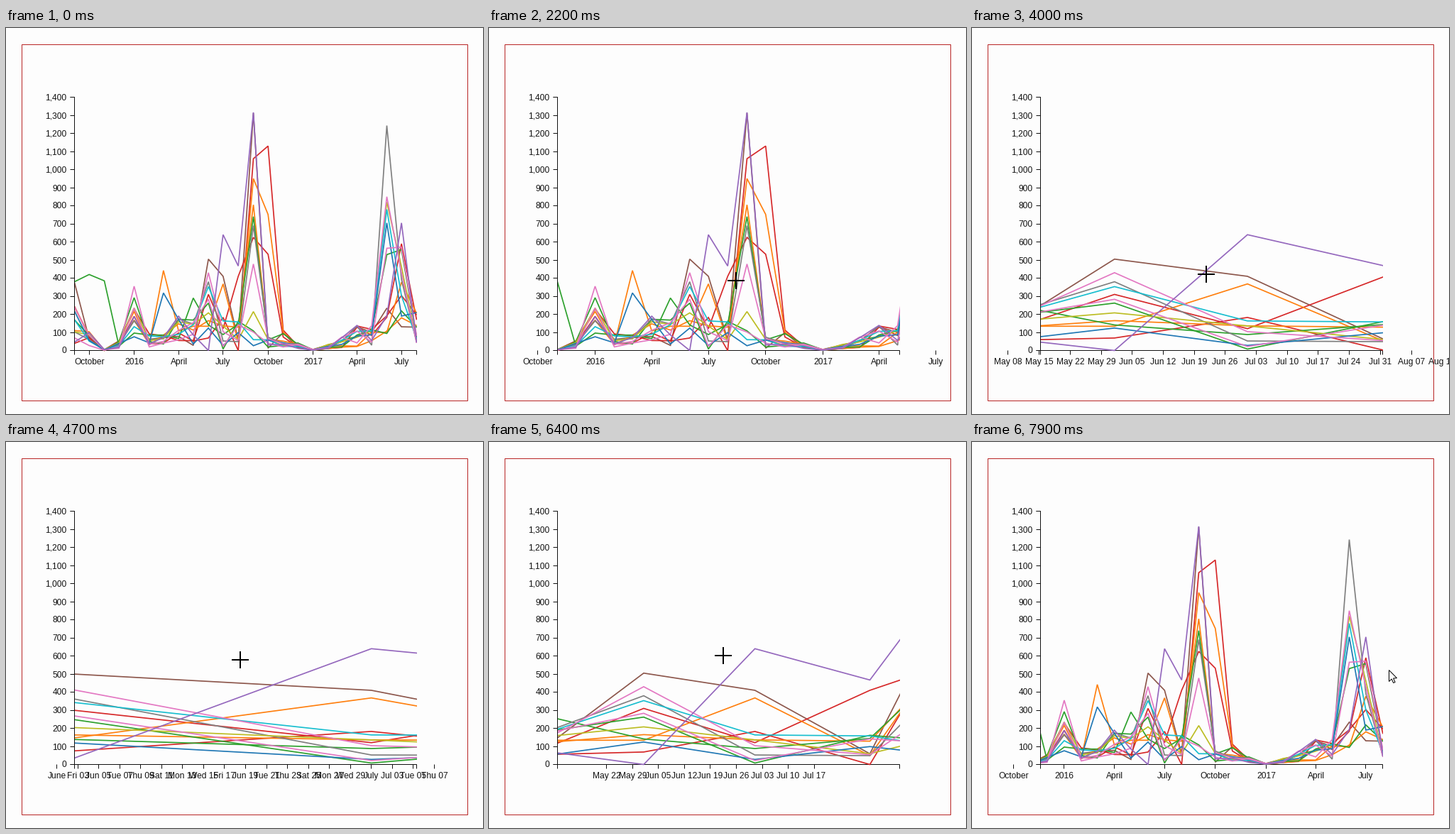
A matplotlib script that plays this animation: 672x544 px, repeating every 8 s.

```python
import math
import numpy as np
import matplotlib.pyplot as plt
from matplotlib.animation import FuncAnimation
from matplotlib.patches import Polygon, Rectangle

W, H, DPI = 672, 544, 100
FRAMES, STEP = 80, 100
LEFT, RIGHT, BASE = 96.5, 578.5, 454.5
UNIT = 0.255
PX = 72 / DPI
INK, PAPER = "#111111", "#fdfdfd"
START = np.datetime64("2015-09-01")
MONTHS = "January February March April May June July August September October November December".split()
WEEKDAYS = "Thu Fri Sat Sun Mon Tue Wed".split()

# colour and the points where a line stands out, {month: value}
SERIES = [
    ("brown", {0: 375, 9: 505, 10: 410, 12: 1312}),
    ("red", {9: 310, 11: 410, 12: 625, 13: 532, 22: 590}),
    ("red", {11: 0, 12: 1060, 13: 1130}),
    ("orange", {6: 442, 10: 368, 12: 950, 13: 752}),
    ("orange", {9: 165, 12: 805}),
    ("green", {0: 380, 1: 420, 2: 385, 8: 290, 12: 740}),
    ("green", {4: 292, 9: 262, 10: 8, 21: 530}),
    ("gray", {9: 380, 12: 690, 21: 1243}),
    ("olive", {9: 208, 12: 215, 21: 820}),
    ("cyan", {9: 353, 21: 780}),
    ("blue", {6: 318, 10: 28, 21: 705}),
    ("pink", {9: 430, 12: 478, 21: 850}),
    ("pink", {4: 355, 9: 283, 10: 22, 21: 565}),
    ("purple", {9: 0, 10: 640, 11: 467, 12: 1316, 22: 705}),
]

# seasonal bumps shared by all lines: month, height, half width
BUMPS = [(0, 180, 1.6), (4, 160, 1.3), (7, 140, 2.5), (10.5, 150, 3),
         (14, 75, 1.5), (19.5, 115, 3), (22, 380, 1.6)]

# time, first visible day, visible days
VIEW = [(1900, 0, 700), (2100, 18.4, 655), (2200, 61.6, 549.6), (3000, 236.9, 127.4),
        (3200, 236.9, 127.4), (3900, 247.5, 103), (4000, 257.3, 77.2),
        (5400, 283.45, 13.8), (5700, 283.45, 13.8), (6000, 281.3, 18.24),
        (6900, 0, 700), (7800, 0, 700), (7900, 79, 620.5)]

# time, x, y
POINTER = [(400, 208, 240), (700, 250, 136), (1000, 309, 286), (2200, 348, 356),
           (3100, 268, 297), (3200, 268, 297), (4000, 330, 347), (4800, 330, 301),
           (6500, 330, 301), (7100, 526, 301), (7900, 587, 321)]


def season(month):
    return sum(h * max(0, 1 - abs(month - c) / w) for c, h, w in BUMPS)


def series_values(rng, peaks):
    return np.array([peaks.get(m, rng.uniform(0.2, 1.5) * season(m) + 6 * noise)
                     for m, noise in enumerate(rng.random(24))])


def view(t):
    """First and last visible day, zooming geometrically about a fixed point."""
    t = min(max(t, VIEW[0][0]), VIEW[-1][0])
    for (t0, a0, s0), (t1, a1, s1) in zip(VIEW, VIEW[1:]):
        if t <= t1:
            break
    span = s0 * (s1 / s0) ** ((t - t0) / (t1 - t0))
    q = (s0 - span) / (s0 - s1) if s0 != s1 else 0
    first = a0 + (a1 - a0) * q
    return first, first + span


def date_parts(day):
    date = START + np.timedelta64(day, "D")
    year, month, dom = map(int, str(date).split("-"))
    return year, month - 1, dom, WEEKDAYS[int(date.astype(int)) % 7]


CALENDAR = [date_parts(d) for d in range(701)]
RULES = {1: lambda m, d, w: True,
         2: lambda m, d, w: d % 2 == 1,
         7: lambda m, d, w: w == "Sun",
         30: lambda m, d, w: d == 1,
         90: lambda m, d, w: d == 1 and m % 3 == 0}


def tick_days(first, last):
    target = (last - first) / 10
    rule = RULES[min(RULES, key=lambda step: abs(math.log(target / step)))]
    lo, hi = max(0, math.ceil(first)), min(700, math.floor(last))
    return [d for d in range(lo, hi + 1) if rule(*CALENDAR[d][1:])]


def tick_label(day):
    year, month, dom, weekday = CALENDAR[day]
    if dom == 1:
        return MONTHS[month] if month else str(year)
    if weekday == "Sun":
        return f"{MONTHS[month][:3]} {dom:02d}"
    return f"{weekday} {dom:02d}"


fig = plt.figure(figsize=(W / DPI, H / DPI), dpi=DPI, facecolor=PAPER)
ax = fig.add_axes([0, 0, 1, 1])
ax.set_xlim(0, W)
ax.set_ylim(H, 0)
ax.axis("off")

FONT = dict(family="Liberation Sans", size=12 * PX, color=INK, va="baseline")


def stroke(xs, ys, width=1, color=INK, zorder=2):
    return ax.plot(xs, ys, color=color, lw=width * PX, zorder=zorder, snap=False,
                   solid_capstyle="butt", solid_joinstyle="miter")[0]


ax.add_patch(Rectangle((22.5, 23.5), 628, 502, fill=False, ec="#b82626", lw=PX, snap=False))

plot_clip = Rectangle((LEFT, 90), RIGHT - LEFT, 366, transform=ax.transData)
page_clip = Rectangle((23, 24), 627, 501, transform=ax.transData)

month_days = np.array([d for d, c in enumerate(CALENDAR) if c[2] == 1])
rng = np.random.default_rng(7)
lines = []
for color, peaks in SERIES:
    values = series_values(rng, peaks)
    line = stroke(month_days, BASE - UNIT * values, 1.7, "tab:" + color, zorder=3)
    line.set_clip_path(plot_clip)
    lines.append(line)

stroke([LEFT - 6, LEFT, LEFT, LEFT - 6], [97.5, 97.5, BASE, BASE])
stroke([LEFT, LEFT, RIGHT, RIGHT], [BASE + 6, BASE, BASE, BASE + 6])
for value in range(0, 1401, 100):
    y = math.floor(BASE - UNIT * value) + 0.5
    stroke([LEFT - 6, LEFT], [y, y])
    ax.text(85.5, y + 4, f"{value:,}", ha="right", **FONT)

ticks = []
for _ in range(30):
    mark = stroke([0, 0], [BASE, BASE + 6])
    label = ax.text(0, 474, "", ha="center", zorder=4, **FONT)
    mark.set_clip_path(page_clip)
    label.set_clip_path(page_clip)
    ticks.append((mark, label))

cross = [stroke([0], [0], 2, "black", zorder=6) for _ in range(2)]
ARROW = np.array([(0, 0), (0, 16), (3.7, 12.5), (6.2, 18), (8.6, 17), (6.1, 11.5), (11, 11.2)])
arrow = Polygon(ARROW, fc="white", ec="black", lw=PX, zorder=6)
ax.add_patch(arrow)


def draw_pointer(t):
    times, xs, ys = zip(*POINTER)
    x, y = round(np.interp(t, times, xs)), round(np.interp(t, times, ys))
    inside = x < RIGHT
    cross[0].set_data([x - 12, x + 12], [y, y])
    cross[1].set_data([x, x], [y - 12, y + 12])
    for bar in cross:
        bar.set_visible(t > 0 and inside)
    arrow.set_xy(ARROW + (x + 0.5, y + 0.5))
    arrow.set_visible(not inside)


def draw(i):
    t = i * STEP
    first, last = view(t)

    def to_x(day):
        return LEFT + (day - first) / (last - first) * (RIGHT - LEFT)

    for line in lines:
        line.set_xdata(to_x(month_days))

    # tick choice lags one step behind the zoom
    days = tick_days(*view(t - STEP))
    for k, (mark, label) in enumerate(ticks):
        shown = k < len(days)
        mark.set_visible(shown)
        label.set_visible(shown)
        if shown:
            x = math.floor(to_x(days[k])) + 0.5
            mark.set_xdata([x, x])
            label.set_x(x)
            label.set_text(tick_label(days[k]))
    draw_pointer(t)
    return []


anim = FuncAnimation(fig, draw, frames=FRAMES, interval=STEP, repeat=True, repeat_delay=0)
plt.show()
```
